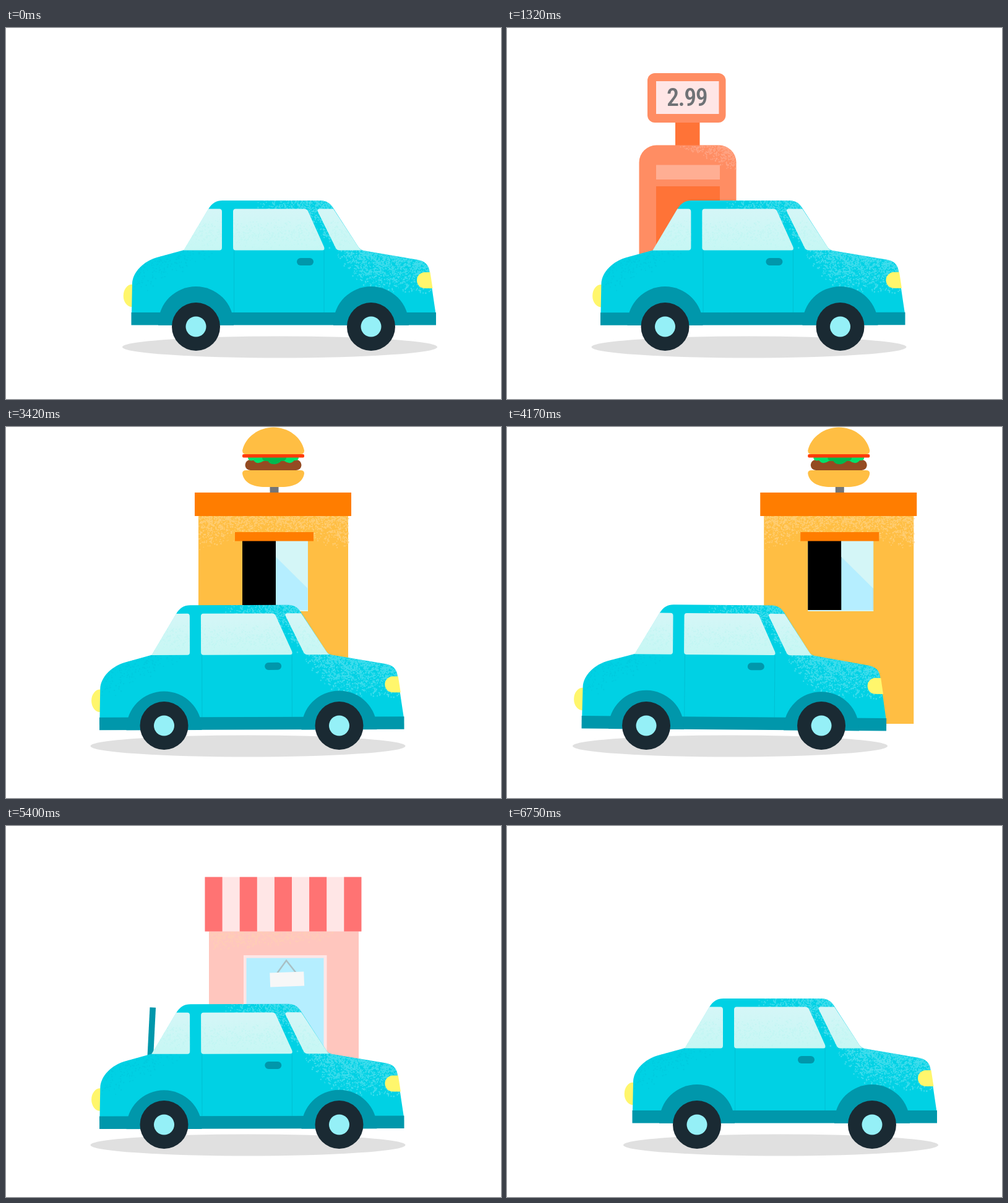
These frames come from a looping animation (800 px wide and 600 px high, 6.78 s). An HTML page with a canvas:

```html
<!DOCTYPE html>
<html lang="en">
<head>
<meta charset="utf-8">
<title>Road trip</title>
<style>
html, body { margin: 0; width: 100%; height: 100%; overflow: hidden; background: #fff; }
canvas { display: block; }
</style>
</head>
<body>
<canvas id="stage" width="800" height="600"></canvas>
<script>
const ctx = document.getElementById('stage').getContext('2d');
const LOOP = 6780, GROUND = 480;
const BRAKE = 414, RECOIL = 180, DRIVE = 440;
const TEAL = '#0097ab', YELLOW = '#fff66c';

// Motion: a smooth step, a dying oscillation and one full sway
function ease(t, start, span) {
  const u = Math.min(1, Math.max(0, (t - start) / span));
  return u * u * (3 - 2 * u);
}
function ring(age, period, decay) {
  return age < 0 ? 0 : Math.sin(2 * Math.PI * age / period) * Math.exp(-age / decay);
}
function sway(age) {
  return age < 0 || age > DRIVE ? 0 : Math.sin(2 * Math.PI * age / DRIVE);
}

let seed = 7;
const random = () => (seed = seed * 16807 % 2147483647) / 2147483647;

// Scattered specks whose density follows a function of the place
function grain(x, y, w, h, n, density) {
  const p = new Path2D();
  while (n--) {
    const px = x + random() * w, py = y + random() * h, s = 0.8 + random() * 1.6;
    if (random() < density(px, py)) p.rect(px, py, s, s);
  }
  return p;
}

function fill(color, shape) {
  ctx.fillStyle = color;
  ctx.fill(typeof shape === 'string' ? new Path2D(shape) : shape);
}
function rect(color, x, y, w, h, r = 0) {
  ctx.fillStyle = color;
  ctx.beginPath();
  ctx.roundRect(x, y, w, h, r);
  ctx.fill();
}
function oval(color, x, y, rx, ry = rx) {
  ctx.fillStyle = color;
  ctx.beginPath();
  ctx.ellipse(x, y, rx, ry, 0, 0, 7);
  ctx.fill();
}
function line(color, width, shape) {
  ctx.strokeStyle = color;
  ctx.lineWidth = width;
  ctx.stroke(new Path2D(shape));
}
function group(draw) {
  ctx.save();
  draw();
  ctx.restore();
}
function clipRect(x, y, w, h) {
  ctx.beginPath();
  ctx.rect(x, y, w, h);
  ctx.clip();
}
function turn(degrees, x, y) {
  ctx.translate(x, y);
  ctx.rotate(degrees * Math.PI / 180);
  ctx.translate(-x, -y);
}

const bodyShape = new Path2D('M203 462L204 413C205 394 223 377 244 371L288 359L327 293' +
  'C333 283 340 279 350 279H508C518 279 525 284 530 293L570 355Q573 359 578 360' +
  'L666 375C676 377 682 382 684 391L694.5 462Z');
const glassShape = new Path2D('M327 292.5H345Q349 292.5 349 297V355Q349 359.5 345 359.5H287Z' +
  'M371 292.5H482Q486 292.5 488 296L514 354Q516 359.5 511 359.5H371Q367 359.5 367 355V297Q367 292.5 371 292.5Z' +
  'M507 292.5H529L570 355Q572 358.5 575 359.5H539Q535 359.5 533 356L504 297Q502 292.5 507 292.5Z');

const roofEdge = x => x < 508 ? 279 : x < 575 ? 279 + (x - 508) * 1.2 : 360 + (x - 575) * 0.16;
const shine = grain(400, 278, 290, 150, 16000, (x, y) =>
  Math.min(1, (x - 400) / 120) * (1.1 - (y - roofEdge(x)) / (x < 508 ? 45 : 55)));
const rearShade = grain(203, 358, 130, 90, 2600, (x, y) => 0.8 - (y - 358) / 100 - (x - 203) / 200);
const glassGrain = grain(288, 305, 285, 55, 2600, (x, y) => 0.7 - Math.abs(y - 332) / 38);
const pumpGrain = grain(270, 190, 101, 42, 2800, (x, y) => (x - 270) / 100 - (y - 190) / 45);
const wallGrain = grain(311, 143, 242, 66, 5500, (x, y) =>
  0.9 - (y - 143) / (35 + 28 * Math.abs(x - 432) / 121));
const shopGrain = grain(328, 170, 200, 42, 3200, (x, y) => 0.9 - (y - 170) / 36 - (x - 328) / 500);

const stops = [
  { draw: pump, arrive: 150, leave: 1950 },
  { draw: diner, arrive: 2590, leave: 3970 },
  { draw: shop, arrive: 4533, leave: 6045 }
];

// Each stop adds its braking, its recoil and its start
const sum = f => stops.reduce((total, s) => total + f(s), 0);
const carX = t => sum(s => -51.5 * ease(t, s.arrive, BRAKE) - 31 * ease(t, s.leave, RECOIL)
  + 82.5 * ease(t, s.leave + RECOIL, DRIVE));
const bodyTilt = t => sum(s => 2.3 * ring(t - s.arrive - 200, 360, 250) + 1.75 * sway(t - s.leave));
const bodySag = t => 9 * (ease(t, 3000, 200) - ease(t, 6240, DRIVE));

function body(t) {
  group(() => {
    turn(3 - 128 * (1 - ease(t, 4980, 200) + ease(t, 6030, 176)), 285, 368);
    rect(TEAL, 280, 284, 9.6, 84);
  });
  oval(YELLOW, 203.5, 433, 13.8, 18.2);
  fill('#00d1e4', bodyShape);
  group(() => {
    ctx.clip(bodyShape);
    fill('rgba(0,190,212,.35)', rearShade);
    fill('rgba(105,228,242,.6)', shine);
  });
  const glass = ctx.createLinearGradient(0, 292, 0, 360);
  glass.addColorStop(0, '#d5f6f7');
  glass.addColorStop(1, '#c6f7f4');
  fill(glass, glassShape);
  group(() => {
    ctx.clip(glassShape);
    fill('rgba(185,246,242,.5)', glassGrain);
  });
  for (const x of [368, 513.5]) rect('rgba(0,151,171,.3)', x, 360, 1, 100);
  rect(TEAL, 470, 372, 27, 12, 6);
  fill(YELLOW, 'M685.5 395H677A13 13 0 0 0 677 421H689.5Z');
  rect(TEAL, 202.5, 460, 492.5, 20.5);
  clipRect(200, 400, 500, 80.7);
  for (const x of [307, 590]) oval(TEAL, x, 479, 61);
}

function car(t) {
  ctx.translate(carX(t), 0);
  oval('#e0e0e0', 442.5, 516, 254.5, 17.5);
  group(() => {
    ctx.translate(0, bodySag(t));
    turn(bodyTilt(t), 449, GROUND);
    body(t);
  });
  for (const x of [307, 590]) {
    oval('#1a2a33', x, 483, 39);
    oval('#95f0f7', x, 483, 16.5);
  }
}

// Digits roll up inside the screen
function price(t) {
  clipRect(241, 86, 102, 53);
  ctx.fillStyle = '#6f7276';
  ctx.font = '500 40px "Roboto Condensed", Roboto, "Liberation Sans", sans-serif';
  ctx.textAlign = 'center';
  [...'2.99'].forEach((c, i) => {
    const x = 268 + i * 15.6;
    if (c === '.') return ctx.fillText(c, x - 1.5, 126);
    const p = c * ease(t, 720, 580), d = Math.floor(p);
    for (const n of [d, d + 1]) ctx.fillText(n % 10, x - (i === 2 ? 3 : 0), 126 + (n - p) * 53);
  });
}

function nozzle(t) {
  ctx.translate(-36.5, 260 * (1 - ease(t, 1450, 300)));
  line('#b5b5b5', 8, 'M438 234C420 233 414 250 413 268L440 275');
  fill('#bdbdbd', 'M420 175L433 167L446 190L433 198Z');
  fill('#ffb400', 'M437 232L464 240L460 340H434Z');
  fill('#ffd73b', 'M428 199L453 185L482 223L472 249L426 231Z');
}

function pump(t) {
  if (t > 1450) group(() => nozzle(t));
  rect('#ff7337', 272, 150, 39.5, 42);
  rect('#ff8d63', 227, 73, 126.5, 80, 12);
  rect('#ffe6e6', 241, 86, 101.5, 53);
  group(() => price(t));
  rect('#ff8d63', 213.5, 189.5, 157, 320, 28);
  group(() => {
    ctx.clip();
    fill('rgba(255,174,147,.65)', pumpGrain);
  });
  rect('#ffae93', 241, 221.5, 103, 23.5);
  rect('#ff7337', 241, 256, 103, 130);
}

function burger() {
  const bun = '#ffbe43';
  rect('#757575', 426.5, 94, 14, 14);
  fill(bun, 'M388 70H476Q482 70 482 75C480 90 465 97 445 97H419C399 97 384 90 382 75Q382 70 388 70Z');
  rect('#944b22', 386.5, 53, 91, 17, 8.5);
  fill('#00e06a', 'M391 49H473Q473 55 466 54Q459 62 450 55H416Q406 62 400 54Q391 56 391 49Z');
  fill('#00b84f', 'M414 49H453Q453 55 445 55Q439 61 432 60Q426 60 423 55Q414 56 414 49Z');
  rect('#ff3c0a', 382, 44, 100, 5.5, 2);
  fill(bun, 'M382 38C387 15 410 .5 432 .5C455 .5 477 15 482 38Q482 44 476 44H388Q382 44 382 38Z');
}

function diner(t) {
  burger();
  rect('#ffbe43', 311, 140, 242, 340);
  fill('rgba(255,210,130,.75)', wallGrain);
  rect('#ff7d00', 305, 106, 253, 38);
  rect('#d5f7f5', 382, 184, 106, 114);
  rect('#000', 382, 184, 105, 112);
  group(() => {
    ctx.translate(54 * ease(t, 3010, 190) - 54, 0);
    rect('#b5eeff', 436, 184, 51.5, 112);
    fill('#d4f6f7', 'M436 184H487.5V261L436 210Z');
  });
  rect('#ff7d00', 370, 170, 127, 14.5);
}

function shop(t, { arrive, leave }) {
  rect('#ffc6be', 328, 168, 242, 312);
  fill('rgba(255,208,180,.7)', shopGrain);
  rect('#ffe6e6', 321.5, 82.5, 253, 88);
  for (let i = 0; i < 9; i += 2) rect('#ff7373', 321.5 + i * 28.1, 82.5, 28.1, 88);
  rect('#ffe6e6', 384, 209, 134.5, 271);
  rect('#b5eeff', 388.5, 213.5, 125, 267);
  turn(15 * sway(t - leave) - 52 * ring(t - arrive, 800, 350), 453, 217);
  line('#a9bfc4', 2.5, 'M437 238L453 217.5L468 238');
  rect('#f7f7f7', 425.5, 236.5, 55, 23);
}

// A building comes up behind the car, waits, recoils and sinks away
function visit(t, stop) {
  const { arrive, leave } = stop, back = leave + RECOIL;
  if (t < arrive - 60 || t > back + DRIVE) return;
  group(() => {
    clipRect(0, 0, 800, GROUND);
    ctx.translate(
      75 * (1 - ease(t, arrive, BRAKE)) + 106 * ease(t, leave, RECOIL) - 216 * ease(t, back, 398),
      GROUND * (1 - ease(t, arrive - 60, 260) + ease(t, back + 155, 220)));
    stop.draw(t, stop);
  });
}

function frame(t) {
  ctx.clearRect(0, 0, 800, 600);
  for (const stop of stops) visit(t, stop);
  group(() => car(t));
}

const start = performance.now();
function loop() {
  frame((performance.now() - start) % LOOP);
  requestAnimationFrame(loop);
}
loop();
</script>
</body>
</html>
```
